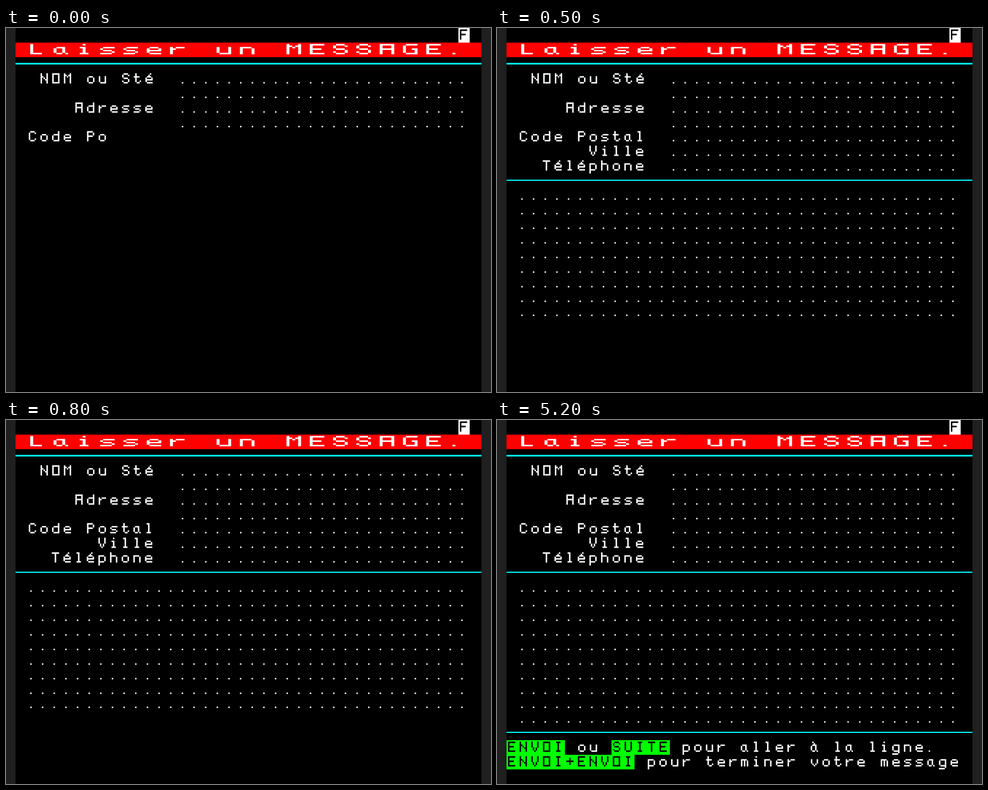
An HTML page that plays this animation: 864 by 648 pixels, repeating every 8000 ms.

```html
<!DOCTYPE html>
<html lang="fr">
<head>
<meta charset="utf-8">
<title>Laisser un message</title>
<style>
  html, body { margin: 0; width: 100%; height: 100%; overflow: hidden; background: #202020; }
  #screen {
    position: absolute; left: 17px; top: 0; width: 830px; height: 648px;
    background: #000; overflow: hidden;
    --cw: 20.75px; --rh: 25.92px;
  }
  #screen p, .rule, .bar {
    position: absolute; margin: 0;
    left: calc(var(--c, 0) * var(--cw)); top: calc(var(--r) * var(--rh));
    width: calc(var(--n, 40) * var(--cw)); height: var(--rh);
  }
  /* The characters stay as selectable text; the pixel lettering is drawn over them. */
  #screen p {
    overflow: hidden; white-space: pre; color: transparent;
    font: 25px/25.92px "DejaVu Sans Mono", monospace; letter-spacing: 5.7px;
  }
  p svg { position: absolute; left: 0; top: 0; width: 100%; height: 100%; fill: #fff; }
  .inv { background: #fff; }
  .key { background: #0f0; }
  .inv svg, .key svg { fill: #000; }
  .bar { background: #f00; }
  .rule { top: calc((var(--r) + .4) * var(--rh)); height: 2.6px; background: #0ff; }
  .second { animation: second 8s step-end infinite; }
  .third { animation: third 8s step-end infinite; }
  @keyframes second { 0% { opacity: 0 } 6.25%, 100% { opacity: 1 } }
  @keyframes third { 0% { opacity: 0 } 12.5%, 100% { opacity: 1 } }
</style>
</head>
<body>
<div id="screen"></div>
<script>
  // Pen strokes per letter: points are "xy" on an 8 by 10 cell, strokes split by "/".
  const strokes = {
    A: '17 11 51 57/14 54',
    C: '52 41 21 12 16 27 47 56',
    E: '51 11 17 57/14 44',
    F: '51 11 17/14 44',
    G: '51 21 12 16 27 57 54 44',
    I: '21 41/31 37/27 47',
    L: '11 17 47',
    M: '17 11 33 51 57',
    N: '17 11/12 56/51 57',
    O: '11 51 57 17 11',
    P: '17 11 41 52 53 44 14',
    S: '52 41 21 12 13 24 44 55 56 47 27 16',
    T: '11 51/31 37',
    U: '11 16 27 47 56 51',
    V: '11 14 25 26 37 46 45 54 51',
    a: '43 23 14 16 27 37 46 43/46 57',
    d: '51 57 27 16 14 23 53',
    e: '57 27 16 14 23 43 54 55 15',
    g: '53 58 49 19/53 23 14 16 27 57',
    h: '11 17/14 23 43 54 57',
    i: '31/23 33 37/27 47',
    l: '21 31 37/27 47',
    m: '17 13 43 54 57/33 37',
    n: '13 17/14 23 43 54 57',
    o: '23 43 54 56 47 27 16 14 23',
    p: '13 19/13 43 54 56 47 17',
    r: '13 17/15 33 53',
    s: '53 23 14 25 45 56 47 17',
    t: '21 26 37 47 56/13 43',
    u: '13 16 27 47 56/53 57',
    v: '13 15 37 55 53',
    '+': '32 36/14 54',
    '.': '27'
  };
  strokes['é'] = strokes.e + '/41 32';
  strokes['à'] = strokes.a + '/21 32';

  const screen = document.getElementById('screen');

  function glyphCells(ch) {
    const cells = new Set();
    for (const stroke of (strokes[ch] || '').split('/')) {
      const points = stroke.split(' ').filter(Boolean).map(p => [+p[0], +p[1]]);
      points.forEach(([x, y], i) => {
        const [px, py] = points[Math.max(0, i - 1)];
        const steps = Math.max(Math.abs(x - px), Math.abs(y - py));
        for (let s = 0; s <= steps; s++) {
          const k = steps ? s / steps : 0;
          cells.add(Math.round(px + (x - px) * k) + ',' + Math.round(py + (y - py) * k));
        }
      });
    }
    return [...cells].map(c => c.split(',').map(Number));
  }

  function lettering(text) {
    const d = [...text].flatMap((ch, i) =>
      glyphCells(ch).map(([x, y]) => `M${i * 8 + x} ${y}h1v1h-1z`)).join('');
    return `<svg viewBox="0 0 ${text.length * 8} 10" preserveAspectRatio="none" aria-hidden="true"><path d="${d}"/></svg>`;
  }

  function add(tag, cls, vars) {
    const el = document.createElement(tag);
    el.className = cls;
    for (const key in vars) el.style.setProperty('--' + key, vars[key]);
    screen.append(el);
    return el;
  }

  function put(r, c, text, cls = '', wide = 1) {
    const el = add('p', cls, { r, c, n: text.length * wide });
    el.textContent = text;
    el.insertAdjacentHTML('beforeend', lettering(text));
  }

  const rule = (r, cls = '') => add('div', 'rule ' + cls, { r });
  const dots = (r, c, cls) => put(r, c, '.'.repeat(39 - c), cls);

  put(0, 38, 'F', 'inv');
  add('div', 'bar', { r: 1 });
  put(1, 1, 'Laisser un MESSAGE.', '', 2);
  rule(2);
  put(3, 2, 'NOM ou Sté');
  put(5, 5, 'Adresse');
  put(7, 1, 'Code Po');
  for (let r = 3; r < 7; r++) dots(r, 14);

  put(7, 8, 'stal', 'second');
  put(8, 7, 'Ville', 'second');
  put(9, 3, 'Téléphone', 'second');
  for (let r = 7; r < 10; r++) dots(r, 14, 'second');
  rule(10, 'second');
  for (let r = 11; r < 20; r++) dots(r, 1, 'second');

  dots(20, 1, 'third');
  rule(21, 'third');
  put(22, 0, 'ENVOI', 'key third');
  put(22, 6, 'ou', 'third');
  put(22, 9, 'SUITE', 'key third');
  put(22, 15, 'pour aller à la ligne.', 'third');
  put(23, 0, 'ENVOI+ENVOI', 'key third');
  put(23, 12, 'pour terminer votre message', 'third');
</script>
</body>
</html>
```
